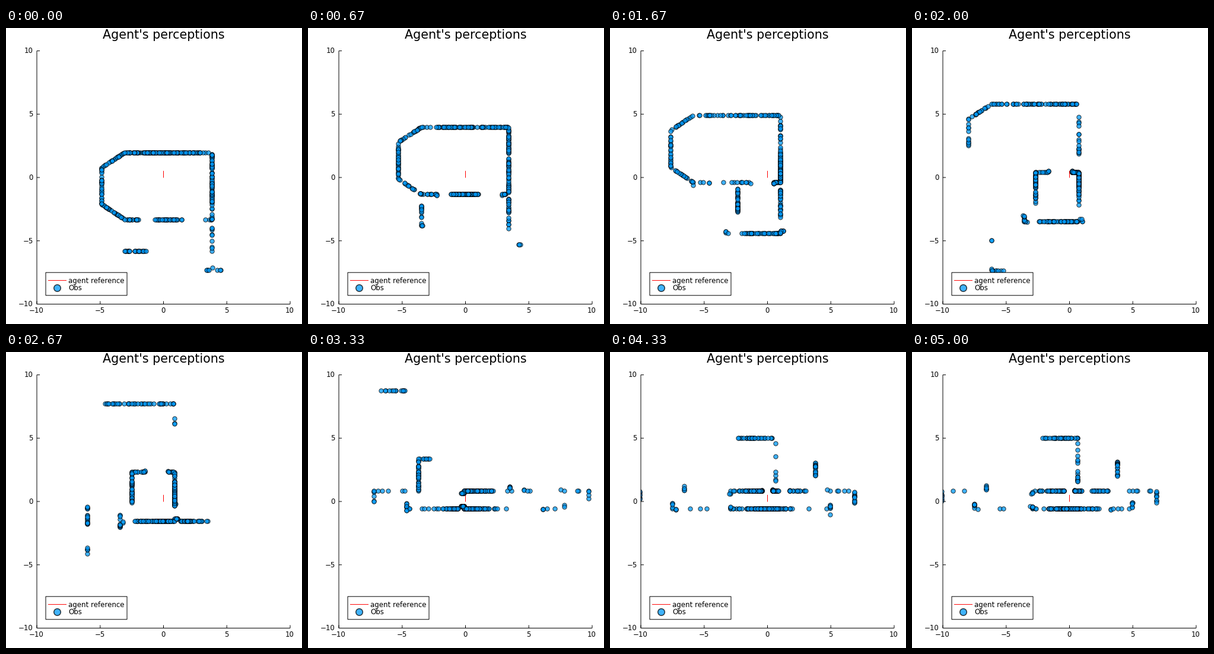
These frames come from a looping animation (499 by 499 pixels, 5330 ms). A matplotlib script:

```python
import numpy as np
import matplotlib.pyplot as plt
from matplotlib.animation import FuncAnimation
from matplotlib.patches import Rectangle

SIZE, DPI = 499, 100
LOOP_MS, TICK_MS = 5330, 26
STEPS_PER_SECOND = 3
RAYS = 420
THICK = 0.11
BLUE = "#009afa"
PX = 72 / DPI  # points per pixel


def path(*pts):
    return [(*a, *b) for a, b in zip(pts, pts[1:])]


def box(x0, y0, x1, y1):
    return path((x0, y0), (x1, y0), (x1, y1), (x0, y1), (x0, y0))


def wall_row(y, *ends):
    """Thick wall along y; ends alternate between start and stop."""
    return sum((box(a, y - THICK, b, y)
                for a, b in zip(ends[::2], ends[1::2])), [])


def floor_plan():
    west, hall, east, far = -3.08, 0.42, 3.81, 13.87
    room, north, south, annex = -3.31, -5.81, -7.31, -1.74
    walls = path((east, north), (east, 1.97), (west, 1.97), (-4.89, 0.8),
                 (-4.89, -2.1), (west, room), (west, -11.2), (3, -11.2))
    walls += wall_row(room, west, -1.83, -0.73, 1.45, 3.3, east)
    walls += path((hall, room), (hall, north))
    # corridor
    walls += wall_row(north, west, hall, east, 6.57, 7.39, 7.98, 8.76, 10.3,
                      11.7, far)
    walls += wall_row(south, -0.5, -0.25, 0.68, 9.42, 10.25, 11.95)
    walls += path((far, north), (far, south))
    for y in (north - 0.31, south):
        walls += box(east, y, east + 0.24, y + 0.18)
    for x in (-0.6, 11.95):
        walls += box(x, south - 0.48, x + 0.1, south + 0.48)
    # rooms beyond the corridor
    walls += path((4, annex), (10.77, annex), (10.77, -5.3))
    walls += path((7.64, annex), (7.64, north))
    return np.array(walls)


WALLS = floor_plan()
# Waypoints of the agent: step, x, y
WAY = np.array([(0, 0, 0), (2, 0.43, -2), (4, 2.47, -2.03), (6, 3.1, -3.83),
                (8, 2.94, -5.75), (9, 3.15, -6.82), (12, 6.18, -6.67),
                (13, 7, -6.74)]).T


def scan(step):
    """Nearest wall hits along random rays, relative to the agent."""
    agent = [np.interp(step, WAY[0], axis) for axis in WAY[1:]]
    angle = np.random.default_rng(40 + step).uniform(0, 2 * np.pi, RAYS)
    rays = np.column_stack([np.cos(angle), np.sin(angle)])
    dx, dy = rays[:, :1], rays[:, 1:]
    sx, sy = (WALLS[:, :2] - agent).T
    ex, ey = (WALLS[:, 2:] - WALLS[:, :2]).T
    det = dx * ey - dy * ex
    dist = (sx * ey - sy * ex) / det
    along = (sx * dy - sy * dx) / det
    hit = (dist > 0) & (along >= 0) & (along <= 1)
    near = np.where(hit, dist, np.inf).min(axis=1)
    seen = np.isfinite(near)
    return rays[seen] * near[seen, None]


fig = plt.figure(figsize=(SIZE / DPI, SIZE / DPI), dpi=DPI, facecolor="white")

LEFT, TOP, SIDE = 52, 38.5, 427
BOTTOM = TOP + SIDE
view = fig.add_axes([LEFT / SIZE, 1 - BOTTOM / SIZE, SIDE / SIZE, SIDE / SIZE])
view.set(xlim=(-10, 10), ylim=(-10, 10))
view.axis("off")
view.plot([0, 0], [0, 0.5], color="red", lw=PX, snap=False, zorder=1)
dots = view.scatter([], [], s=(7.3 * PX) ** 2, c=BLUE, edgecolors="black",
                    linewidths=PX, alpha=0.75, zorder=2)

# Pixel-space layer for axes, labels and legend
page = fig.add_axes([0, 0, 1, 1])
page.set(xlim=(0, SIZE), ylim=(SIZE, 0))
page.axis("off")


def line(xs, ys, color="black"):
    page.plot(xs, ys, color=color, lw=PX, solid_capstyle="butt", snap=False)


def label(x, y, s, size=11.8, ha="center"):
    page.text(x, y, s, fontsize=size * PX, ha=ha, va="baseline",
              family="DejaVu Sans")


line([LEFT, LEFT], [TOP, BOTTOM])
line([LEFT, LEFT + SIDE], [BOTTOM, BOTTOM])
for v in range(-10, 11, 5):
    text = str(v).replace("-", "\u2212")
    offset = (v + 10) * SIDE / 20
    x, y = LEFT + offset, BOTTOM - offset
    line([x, x], [BOTTOM, BOTTOM - 5])
    line([LEFT, LEFT + 5], [y, y])
    label(x - 0.4, 480, text)
    label(45.7, y + 3.8, text, ha="right")
label(266, 18.4, "Agent's perceptions", 20.65)

page.add_patch(Rectangle((67, 412.2), 137, 38.6, fc="white", ec="black",
                         lw=PX, snap=False, zorder=1.5))
line([71, 102], [425.6, 425.6], "red")
page.scatter([86.5], [438.2], s=(11.5 * PX) ** 2, c=BLUE, edgecolors="black",
             linewidths=1.5 * PX, alpha=0.75, zorder=3)
label(105, 430, "agent reference", ha="left")
label(105, 442.4, "Obs", ha="left")


def draw(tick):
    step = (tick + 1) * TICK_MS * STEPS_PER_SECOND // 1000
    dots.set_offsets(scan(step))
    return dots,


anim = FuncAnimation(fig, draw, frames=LOOP_MS // TICK_MS, interval=TICK_MS,
                     repeat=True, repeat_delay=0)
plt.show()
```
